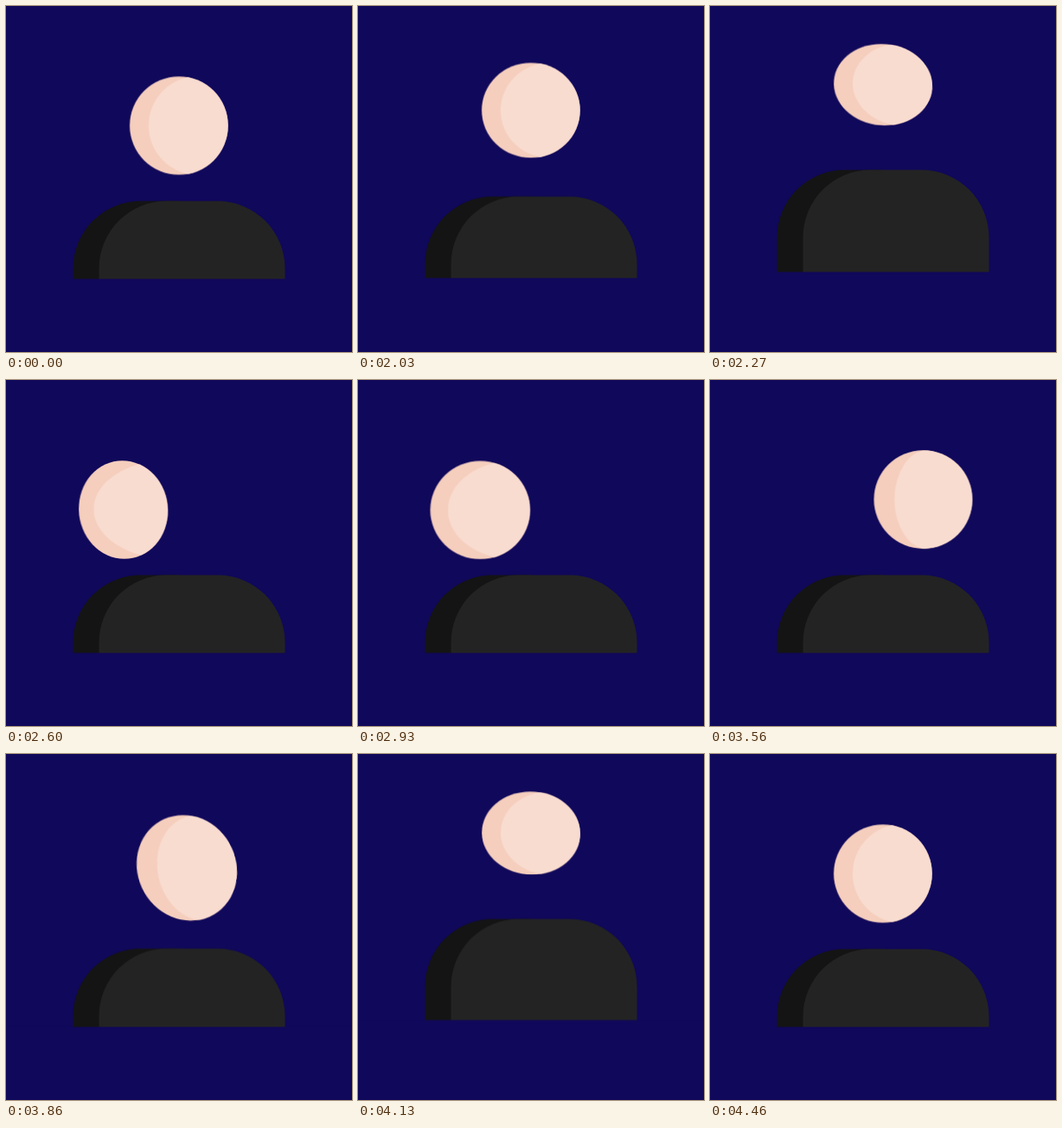
These frames come from a looping animation (400x400 px, 4.55 s). An HTML page without scripts:

```html
<!DOCTYPE html>
<html lang="en">
<head>
<meta charset="utf-8">
<title>Bouncing head</title>
<style>
  html, body { margin: 0; height: 100%; overflow: hidden; background: #10085a; }
  svg { display: block; width: 100vw; height: 100vh; }
  .head, .glow, .torso, .floor { animation: 4550ms linear infinite; transform-origin: 0 0; }
  .head { animation-name: head; }
  .glow { animation-name: glow; }
  .torso { animation-name: torso; }
  .floor { animation-name: floor; }

  /* hop, land left, roll right, hop back to the middle */
  @keyframes head {
    0%, 44.6% { transform: translate(199.8px, 138.3px) skewX(0deg) scale(1, 1); }
    44.615% { transform: translate(199.8px, 121px) skewX(0deg) scale(1, .968); animation-timing-function: ease-out; }
    47.912% { transform: translate(199.8px, 89px) skewX(1deg) scale(1, .875); animation-timing-function: ease-in-out; }
    49.89% { transform: translate(200px, 91px) skewX(2.4deg) scale(1, .831); animation-timing-function: ease-in-out; }
    55.824% { transform: translate(155px, 150px) skewX(2deg) scale(1, 1); }
    57.143% { transform: translate(135.5px, 150px) skewX(1.2deg) scale(.903, 1); animation-timing-function: ease-out; }
    59.78%, 63.736% { transform: translate(141px, 150px) skewX(0deg) scale(1, 1); animation-timing-function: ease-in; }
    65.714% { transform: translate(142px, 152px) skewX(0deg) scale(1.09, 1); animation-timing-function: ease-in; }
    69.011% { transform: translate(185px, 157.5px) skewX(0deg) scale(1.092, .995); animation-timing-function: ease-out; }
    73.626%, 77.582% { transform: translate(247px, 138.3px) skewX(0deg) scale(1, 1); animation-timing-function: ease-in-out; }
    84.835% { transform: translate(209px, 132px) skewX(4.2deg) scale(1.017, 1.075); animation-timing-function: ease-out; }
    89.78% { transform: translate(200px, 90px) skewX(1deg) scale(1, .84); animation-timing-function: ease-in-out; }
    98.022%, 100% { transform: translate(199.8px, 138.3px) skewX(0deg) scale(1, 1); }
  }

  /* lit side: translate places the arc, scale sets its bulge */
  @keyframes glow {
    0%, 49.89% { transform: translateX(22px) scaleX(1); }
    57.143% { transform: translateX(59px) scaleX(1.7); }
    59.78%, 63.736% { transform: translateX(45px) scaleX(1.45); }
    69.011% { transform: translateX(0) scaleX(.55); }
    73.626%, 77.582% { transform: translateX(4px) scaleX(.65); }
    84.835% { transform: translateX(16px) scaleX(.87); }
    89.78%, 100% { transform: translateX(22px) scaleX(1); }
  }

  @keyframes torso {
    0%, 44.6% { transform: translateY(0); }
    44.615% { transform: translateY(-5px); animation-timing-function: ease-out; }
    49.89% { transform: translateY(-36px); animation-timing-function: ease-in-out; }
    55.2%, 84.4% { transform: translateY(0); animation-timing-function: ease-in-out; }
    89.78% { transform: translateY(-36px); animation-timing-function: ease-in-out; }
    97.4%, 100% { transform: translateY(0); }
  }

  @keyframes floor {
    0%, 44.6% { transform: translateY(0); }
    44.615% { transform: translateY(-1px); animation-timing-function: ease-out; }
    49.89% { transform: translateY(-8px); animation-timing-function: ease-in-out; }
    55.2%, 84.4% { transform: translateY(0); animation-timing-function: ease-in-out; }
    89.78% { transform: translateY(-8px); animation-timing-function: ease-in-out; }
    97.4%, 100% { transform: translateY(0); }
  }
</style>
</head>
<body>
<svg viewBox="0 0 400 400">
  <clipPath id="face"><circle r="56.8"/></clipPath>
  <rect width="400" height="400" fill="#10085a"/>
  <g class="torso">
    <path fill="#141414" d="M77.5 370V303.5a78 78 0 0 1 78-78H200V370z"/>
    <path fill="#232323" d="M107.5 370V303.5a78 78 0 0 1 78-78h59a78 78 0 0 1 78 78V370z"/>
  </g>
  <rect class="floor" y="315.5" width="400" height="100" fill="#10085a"/>
  <g class="head">
    <circle r="56.8" fill="#f5cebd"/>
    <g clip-path="url(#face)">
      <path class="glow" fill="#f8dcd0" d="M200-57H0A57 57 0 0 0 0 57H200z"/>
    </g>
  </g>
</svg>
</body>
</html>
```
